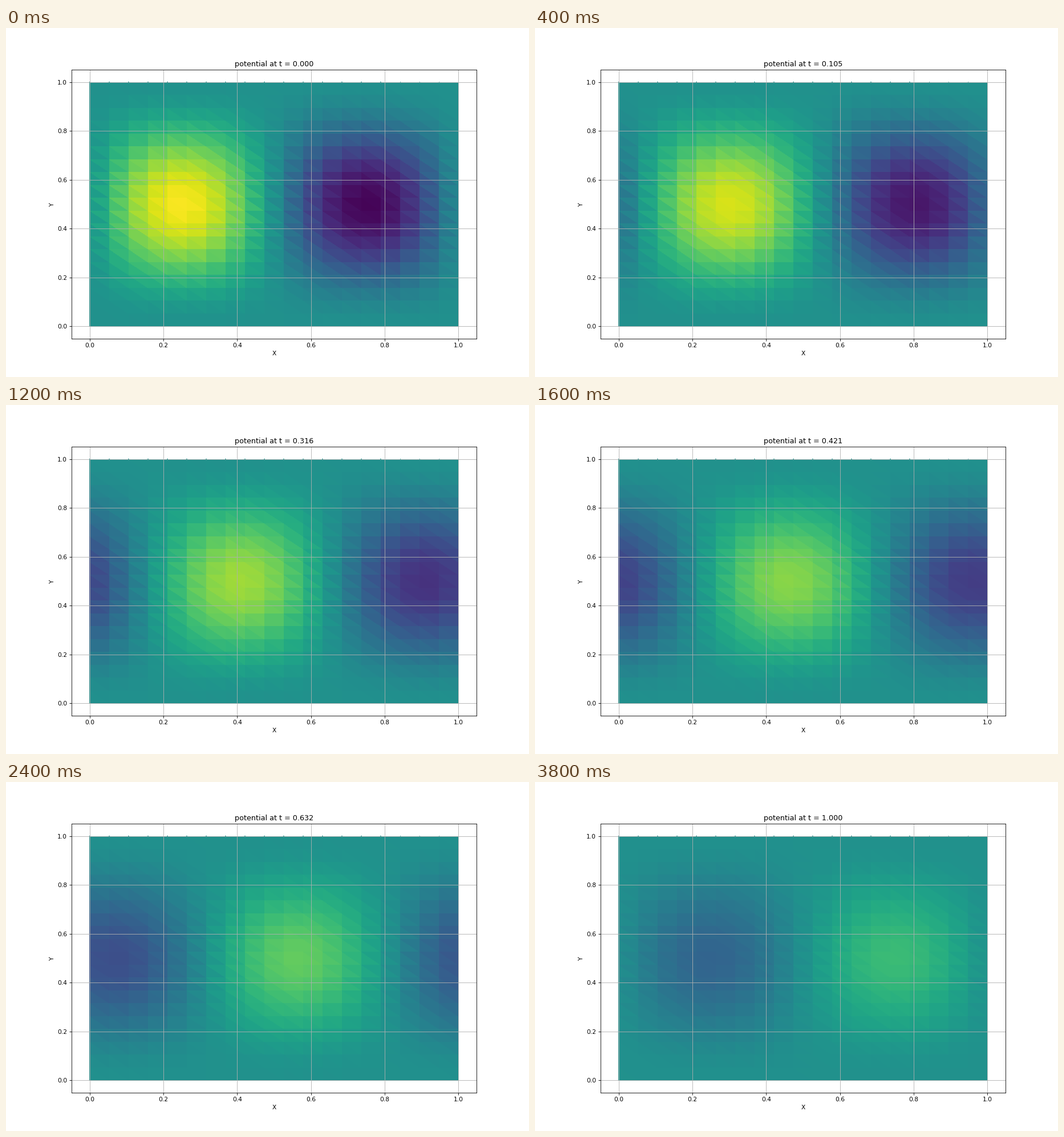
Write a matplotlib script that moves like this. It is 917x611 px and loops after 4 s.

```python
import numpy as np
import matplotlib.pyplot as plt
from matplotlib.animation import FuncAnimation
from matplotlib.tri import Triangulation

N = 20        # grid points per side
FRAMES = 20
INTERVAL = 200

axis = np.linspace(0, 1, N)
times = np.linspace(0, 1, FRAMES)
X, Y = (g.ravel() for g in np.meshgrid(axis, axis))

# Split every grid cell along its falling diagonal.
ll = (np.arange(N - 1)[:, None] * N + np.arange(N - 1)).ravel()
lr, ul, ur = ll + 1, ll + N, ll + N + 1
tri = Triangulation(X, Y, np.vstack([np.c_[ll, lr, ul], np.c_[lr, ur, ul]]))


def potential(t):
    """Decaying wave that drifts to the right, averaged per triangle."""
    u = np.exp(-t) * np.sin(2 * np.pi * X - np.pi * t) * np.sin(np.pi * Y) ** 2
    return u[tri.triangles].mean(axis=1)


plt.rcParams["font.family"] = "DejaVu Sans"
fig, ax = plt.subplots(figsize=(12.0066, 8), dpi=76.375)
mesh = ax.tripcolor(tri, facecolors=potential(0), cmap="viridis", vmin=-1, vmax=1)
ax.set(xlabel="X", ylabel="Y", xlim=(-0.05, 1.05), ylim=(-0.05, 1.05))
ax.grid(True)
title = ax.set_title("")


def update(i):
    mesh.set_array(potential(times[i]))
    title.set_text(f"potential at t = {times[i]:.3f}")
    return mesh, title


anim = FuncAnimation(fig, update, frames=FRAMES, interval=INTERVAL,
                     repeat=True, repeat_delay=0)
plt.show()
```
